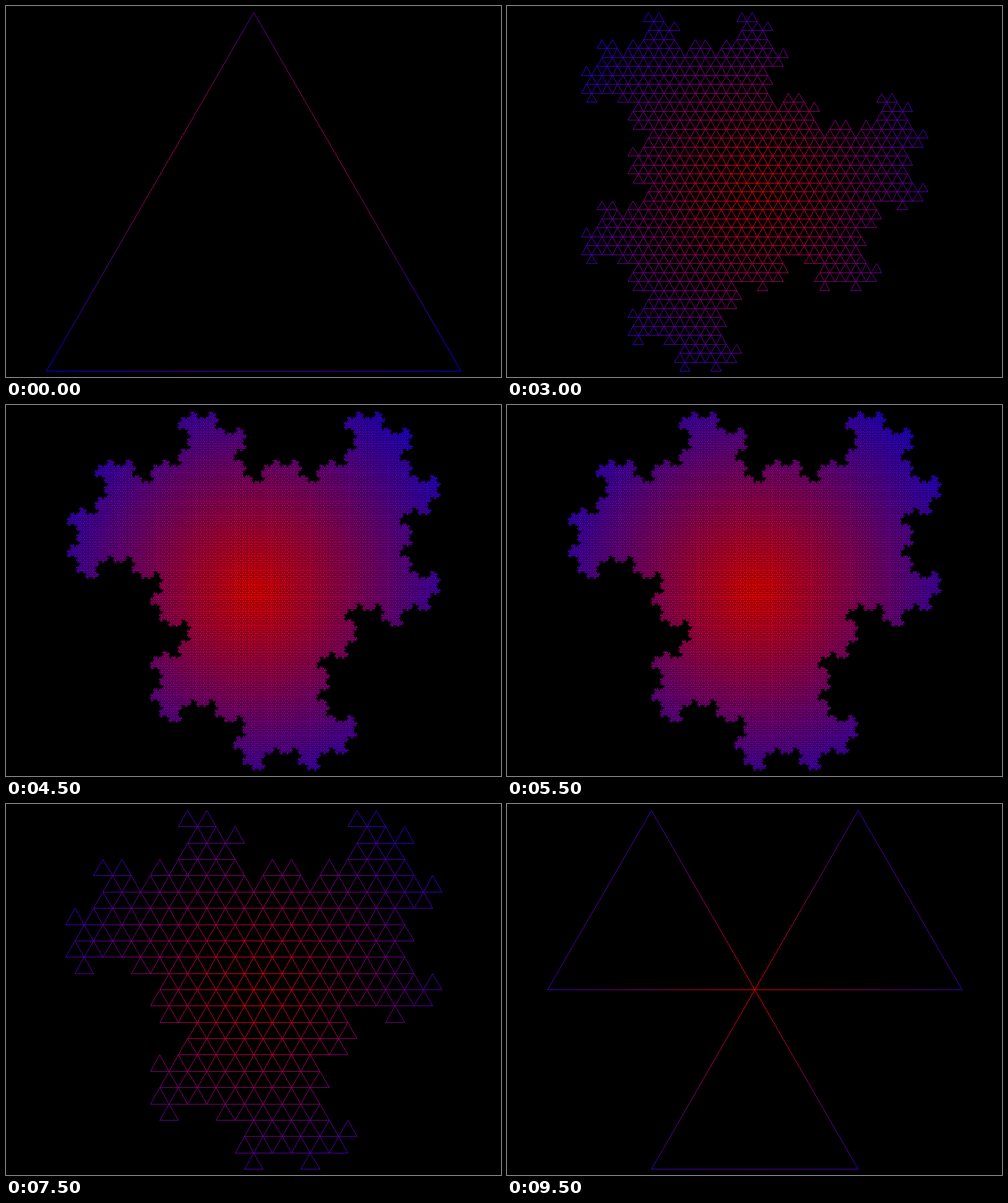
An HTML page with a canvas that plays this animation: 800x600 px, repeating every 10000 ms.

```html
<!DOCTYPE html>
<html lang="en">
<head>
<meta charset="utf-8">
<title>Triangle dragon</title>
<style>
  html, body { margin: 0; width: 100%; height: 100%; overflow: hidden; background: #000; }
  canvas { display: block; width: 800px; height: 600px; }
</style>
</head>
<body>
<canvas id="stage" width="800" height="600"></canvas>
<script>
const W = 800, H = 600, PAD = 10, MAX = 10, STEP = 500;
const ctx = document.getElementById('stage').getContext('2d');
const ROW = Math.sqrt(3) / 2;

// Closed curve F+F+F with rule F -> F-F+F, turning by 120 degrees
function curve(order) {
  const side = 3 ** order, count = 3 * side;
  const xs = new Float64Array(count + 1), ys = new Float64Array(count + 1);
  const dx = [1, -0.5, -0.5], dy = [0, -1, 1];
  let dir = 0, x = 0, y = 0;
  for (let k = 0; k < count; k++) {
    if (k) {
      let n = k;
      while (n % 3 === 0) n /= 3;
      const left = k % side === 0 || n % 3 === 2;
      dir = (dir + (left ? 1 : 2)) % 3;
    }
    x += dx[dir];
    y += dy[dir];
    xs[k + 1] = x;
    ys[k + 1] = y * ROW;
  }
  return { xs, ys };
}

function range(list) {
  let lo = Infinity, hi = -Infinity;
  for (const n of list) {
    if (n < lo) lo = n;
    if (n > hi) hi = n;
  }
  return { mid: (lo + hi) / 2, size: hi - lo };
}

function line(x0, y0, x1, y1, plot) {
  const dx = Math.abs(x1 - x0), dy = -Math.abs(y1 - y0);
  const sx = x0 < x1 ? 1 : -1, sy = y0 < y1 ? 1 : -1;
  let err = dx + dy;
  for (;;) {
    plot(x0, y0);
    if (x0 === x1 && y0 === y1) return;
    const e2 = 2 * err;
    if (e2 >= dy) { err += dy; x0 += sx; }
    if (e2 <= dx) { err += dx; y0 += sy; }
  }
}

function render(order) {
  const { xs, ys } = curve(order);
  const bx = range(xs), by = range(ys);
  const scale = Math.min((W - 2 * PAD) / bx.size, (H - 2 * PAD) / by.size);
  const reach = Math.hypot(bx.size, by.size) * scale / 2;
  const px = i => Math.round(W / 2 + (xs[i] - bx.mid) * scale);
  const py = i => Math.round(H / 2 + (ys[i] - by.mid) * scale);

  const image = ctx.createImageData(W, H);
  const data = image.data;
  for (let i = 3; i < data.length; i += 4) data[i] = 255;

  // Red in the middle, blue at the corners of the bounding box
  const plot = (x, y) => {
    const t = Math.min(1, Math.hypot(x - W / 2, y - H / 2) / reach);
    const i = (y * W + x) * 4;
    data[i] = 255 * (1 - t);
    data[i + 2] = 255 * t;
  };
  for (let i = 1; i < xs.length; i++) line(px(i - 1), py(i - 1), px(i), py(i), plot);
  return image;
}

const images = Array.from({ length: MAX + 1 }, (_, n) => render(n));
const start = performance.now();
let shown = -1;

function draw() {
  const step = Math.floor((performance.now() - start) / STEP) % (2 * MAX);
  const order = MAX - Math.abs(MAX - step);
  if (order !== shown) {
    ctx.putImageData(images[order], 0, 0);
    shown = order;
  }
  requestAnimationFrame(draw);
}
draw();
</script>
</body>
</html>
```
